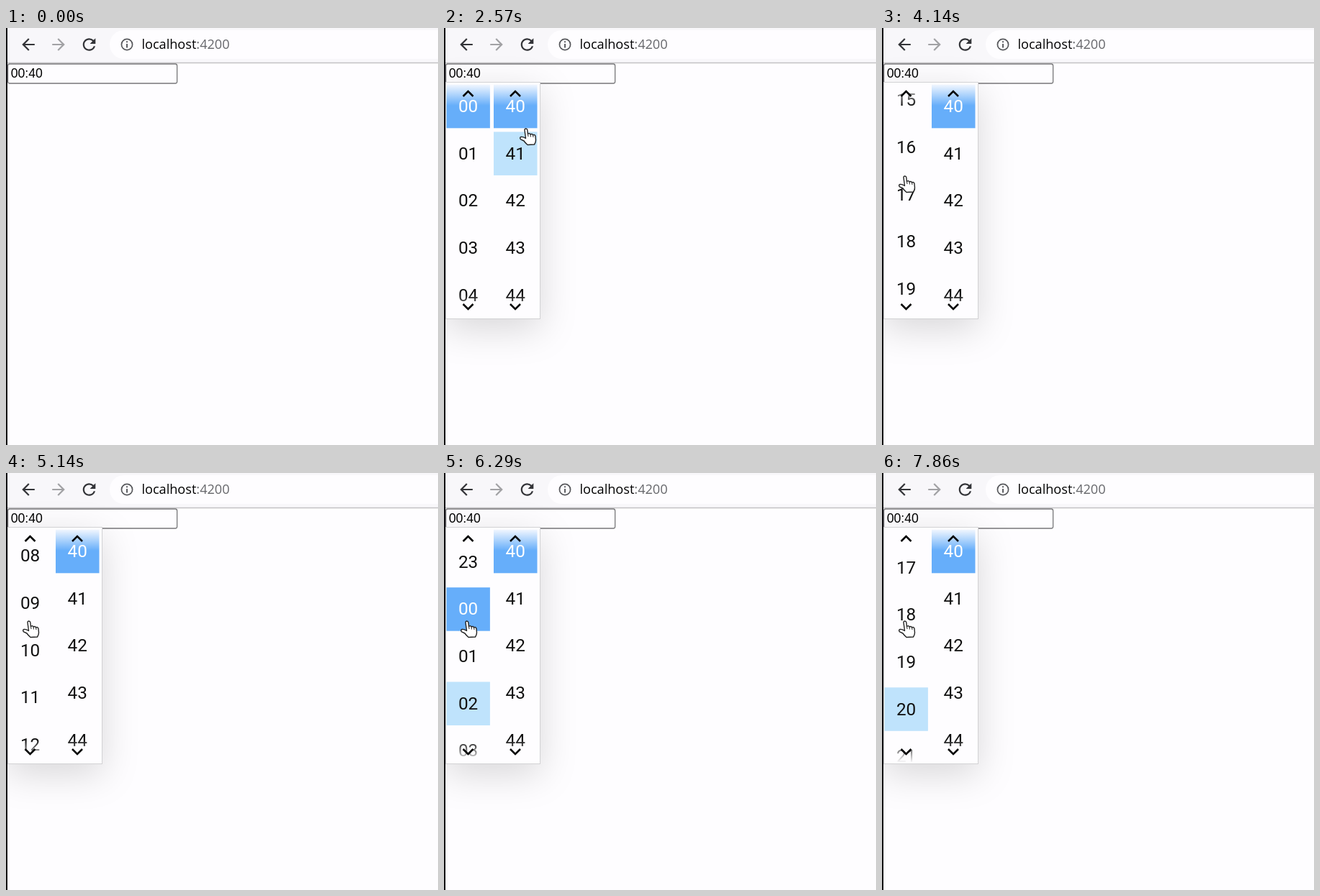
An HTML page for the animation above (8000 ms loop, 600 by 580 pixels).

```html
<!DOCTYPE html>
<html lang="en">
<head>
<meta charset="utf-8">
<title>Time picker</title>
<style>
  html, body { margin: 0; width: 100%; height: 100%; overflow: hidden; background: #fefdff; }
  svg { display: block; }
  .url { font: 18.1px "Open Sans", "Noto Sans", sans-serif; }
  .value { font: 17.6px "Liberation Sans", Arial, sans-serif; }
  .item { font: 24.3px Roboto, sans-serif; text-anchor: middle; }
  .line { fill: none; stroke: #000; stroke-width: 2.5; }
  .panel { fill: #fefdff; stroke: #d2d2d4; filter: drop-shadow(0 14px 25px rgba(0, 0, 0, .15)); }
</style>
</head>
<body>
<svg width="600" height="580" viewBox="0 0 600 580">
  <defs>
    <linearGradient id="fade" x2="0" y2="1">
      <stop stop-color="#fefdff"/>
      <stop offset="1" stop-color="#fefdff" stop-opacity="0"/>
    </linearGradient>
    <clipPath id="inside"><path d="M3 76H133V404H3z"/></clipPath>
    <path id="arrow" d="M8 -1H-4.17L1.42 -6.59 0 -8 -8 0 0 8 1.41 6.59 -4.17 1H8z"/>
    <g id="fader">
      <path d="M3 76H133V108H3z" fill="url(#fade)"/>
      <path class="line" d="M26.5 95l7-7 7 7M92 95l7-7 7 7"/>
    </g>
  </defs>

  <!-- browser bar -->
  <path d="M0 0H600V48H0z" fill="#f8f7fa"/>
  <path d="M600 3H164a20 20 0 0 0 0 40H600z" fill="#fefdff"/>
  <path d="M0 48.5H600" stroke="#c3c2c4" stroke-width="1.3"/>
  <use href="#arrow" transform="translate(31 23) scale(1.1)" fill="#333438"/>
  <use href="#arrow" transform="translate(73 23) scale(-1.1 1.1)" fill="#a2a2a5"/>
  <path transform="translate(102.3 9.8) scale(1.1)" fill="#333438" d="M17.65 6.35A7.96 7.96 0 0 0 12 4c-4.42 0-8 3.58-8 8s3.58 8 8 8c3.73 0 6.84-2.55 7.73-6h-2.08A6 6 0 0 1 12 18c-3.31 0-6-2.69-6-6s2.69-6 6-6c1.66 0 3.14.69 4.22 1.78L13 11h7V4z"/>
  <circle cx="168" cy="23" r="7.6" fill="none" stroke="#56575b" stroke-width="1.7"/>
  <path d="M168 18.3v2M168 22v5.4" stroke="#56575b" stroke-width="1.9"/>
  <text class="url" x="188.5" y="29.3">localhost<tspan fill="#66676b">:4200</tspan></text>

  <!-- time field -->
  <rect id="field" x="2.6" y="50" width="235" height="27" rx="2.5" fill="#fefdff" stroke-width="1.3"/>
  <text class="value" x="6.8" y="69.2">00:40</text>

  <g id="popup">
    <rect class="panel" x="2.5" y="75.5" width="131" height="329"/>
    <g id="items" clip-path="url(#inside)"></g>
    <use href="#fader"/>
    <use href="#fader" transform="matrix(1 0 0 -1 0 479)"/>
  </g>
  <path d="M0 0H2V580H0z" fill="#111014"/>

  <g id="pointer" stroke-linejoin="round">
    <path id="plain" d="M0 0V18L4.3 14.2 7.2 21 10 19.8 7.2 13.2H13z" fill="#fff" stroke="#111" stroke-width="1.2"/>
    <g id="beam" fill="none">
      <path d="M-4-10H4M-4 10H4M0-10V10" stroke="#fff" stroke-width="3.4"/>
      <path d="M-4-10H-1.5L0-9 1.5-10H4M-4 10H-1.5L0 9 1.5 10H4M0-9V9" stroke="#111" stroke-width="1.5"/>
    </g>
    <g id="hand" stroke="#222" stroke-width="1.4">
      <path fill="#fff" d="M-3 2Q-3 0-1.2 0 .6 0 .8 2L1.5 7.5Q4 5.5 5 8 7.5 6.5 8.5 9 11 7.5 12 10.5L12.5 16Q12.5 19 10.5 22L1 22.5Q-2 20-4 17L-8.5 14.8Q-10.5 12.5-8 11.5-5.5 11-1.5 13.5z"/>
      <path fill="none" stroke-width="1" d="M1.5 7.5L2 11M5 8L5.5 11.5M8.5 9L9 12"/>
    </g>
  </g>
</svg>
<script>
const $ = id => document.getElementById(id);
const RATE = 7, LENGTH = 56, PITCH = 65.65, FIRST = 109;
const OPEN = 14, SCROLL = 21, PAUSE = 53;

// keys: tick, value(s)
const path = [[7, 435, 92], [8, 335, 83], [9, 240, 72], [10, 200, 69], [11, 185, 68],
  [12, 181, 69], [15, 181, 69], [17, 150, 100], [19, 80, 180], [20, 33, 206]];
const scroll = [[21, 0], [22, 22], [23, 73], [29, 582.2], [36, 1056.6], [44, 1656],
  [52, 1940], [53, 1950], [55, 2057.7]];

function at(keys, k, col = 1) {
  const i = keys.findIndex(key => key[0] > k);
  if (i < 0) return keys[keys.length - 1][col];
  if (i === 0) return keys[0][col];
  const a = keys[i - 1], b = keys[i];
  return a[col] + (b[col] - a[col]) * (k - a[0]) / (b[0] - a[0]);
}

const show = (id, on) => $(id).setAttribute('display', on ? 'inline' : 'none');

function column(x, shift, base, count, hover) {
  let out = '';
  const start = Math.floor(-shift / PITCH) - 1;
  for (let n = start; n < start + 8; n++) {
    const y = FIRST + n * PITCH + shift;
    const value = ((base + n) % count + count) % count;
    const picked = value === base;
    const fill = picked ? '#66aefa' : value === hover ? '#bfe3fc' : 'none';
    out += `<rect x="${x - 30.2}" y="${y - 30.2}" width="60.5" height="60.5" fill="${fill}"/>` +
      `<text class="item" x="${x}" y="${y + 8}" fill="${picked ? '#fff' : '#111'}">` +
      `${String(value).padStart(2, '0')}</text>`;
  }
  return out;
}

// Item under the pointer; it stays marked while the list is scrolling.
function hovered(k, left, right, base, count, moves) {
  const rest = k < SCROLL ? k : k < PAUSE ? SCROLL : PAUSE;
  const x = at(path, rest), y = at(path, rest, 2) + 6;
  if (x < left || x > right || y < 78) return -1;
  const n = Math.round((y - FIRST - (moves ? at(scroll, rest) : 0)) / PITCH);
  return ((base + n) % count + count) % count;
}

function draw(k) {
  const x = at(path, k), y = at(path, k, 2), open = k >= OPEN;
  const inPopup = open && x < 134 && y > 75;
  const inField = k >= path[0][0] && x < 238 && y < 78;
  $('field').setAttribute('stroke', inField ? '#242426' : '#777779');
  show('popup', open);
  if (open) {
    $('items').innerHTML =
      column(33.6, at(scroll, k), 0, 24, hovered(k, 3, 66, 0, 24, true)) +
      column(99.2, 0, 40, 60, hovered(k, 69, 132, 40, 60, false));
  }
  show('pointer', k >= path[0][0]);
  $('pointer').setAttribute('transform', `translate(${x} ${y})`);
  show('hand', inPopup);
  show('beam', inField && !inPopup);
  show('plain', !inField && !inPopup);
}

let last = -1;
const begin = performance.now();
function tick() {
  const k = Math.floor((performance.now() - begin + 5) * RATE / 1000) % LENGTH;
  if (k !== last) draw(last = k);
  requestAnimationFrame(tick);
}
tick();
</script>
</body>
</html>
```
